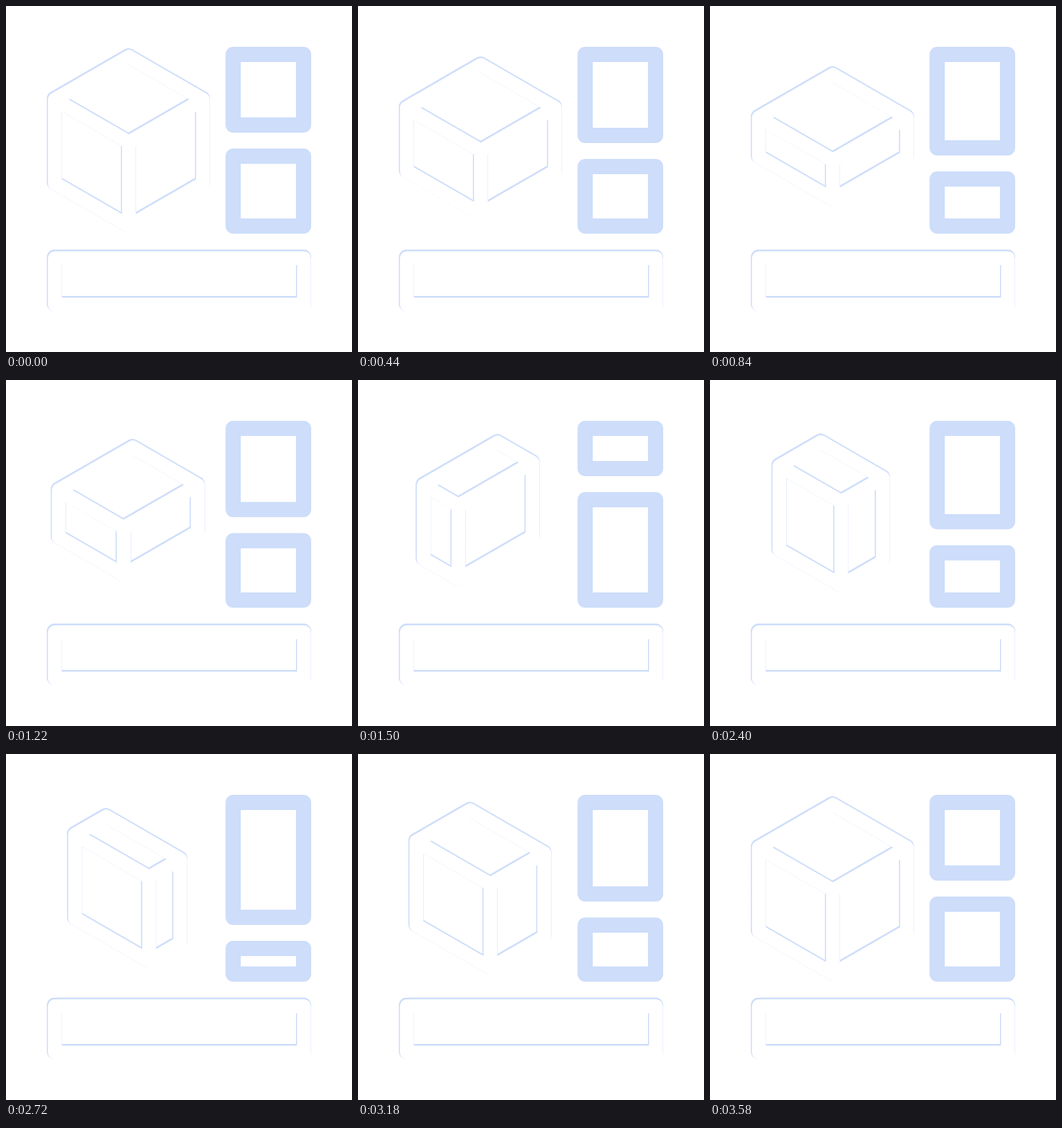
An HTML page with a canvas that plays this animation: 500 by 500 pixels, repeating every 3.6 s.

```html
<!DOCTYPE html>
<html lang="en">
<head>
<meta charset="utf-8">
<title>Box layout</title>
<style>
  html, body { margin: 0; width: 100%; height: 100%; overflow: hidden; background: #fff; }
  canvas { display: block; width: 500px; height: 500px; }
</style>
</head>
<body>
<canvas id="stage" width="500" height="500"></canvas>
<script>
const ctx = document.getElementById("stage").getContext("2d");
const LOOP = 3600;
const BLUE = "#cdddfa";
const SLOPE = Math.tan(Math.PI / 6);

// left: x of the left edge, top: y of the apex, a/b: widths of the left and
// right faces, height: of the box, split: lower edge of the upper square
const keys = [
  { at: 0,    left: 70,    top: 72,   a: 107,  b: 107, height: 121,  split: 172 },
  { at: 915,  left: 70,    top: 98.2, a: 107,  b: 107, height: 56.3, split: 205.2 },
  { at: 1830, left: 101.2, top: 86.4, a: 34.2, b: 107, height: 121,  split: 106 },
  { at: 2740, left: 99.2,  top: 89,   a: 107,  b: 45,  height: 121,  split: 236 }
];
keys.push({ ...keys[0], at: LOOP });

function easeInOut(x) {
  return x < 0.5 ? (2 * x) ** 2.5 / 2 : 1 - (2 - 2 * x) ** 2.5 / 2;
}

function poseAt(time) {
  const i = keys.findIndex(key => key.at > time);
  const from = keys[i - 1], to = keys[i];
  const p = easeInOut((time - from.at) / (to.at - from.at));
  const pose = {};
  for (const name in from) pose[name] = from[name] + (to[name] - from[name]) * p;
  return pose;
}

function polygon(path, points) {
  points.forEach(([x, y], i) => i ? path.lineTo(x, y) : path.moveTo(x, y));
  path.closePath();
}

function boxPath({ left, top, a, b, height }) {
  const path = new Path2D();
  const middle = left + a, right = middle + b;
  const leftY = top + b * SLOPE;
  const rightY = top + a * SLOPE;
  const middleY = leftY + a * SLOPE;
  const front = [middle, middleY], foot = [middle, middleY + height];
  polygon(path, [[left, leftY], [left + b, top], [right, rightY], front]);
  polygon(path, [[left, leftY], front, foot, [left, leftY + height]]);
  polygon(path, [front, [right, rightY], [right, rightY + height], foot]);
  return path;
}

function stroke(path, color, width) {
  ctx.strokeStyle = color;
  ctx.lineWidth = width;
  ctx.stroke(path);
}

// A white copy, slightly lower and thinner, leaves only rims of the blue line
function strokeRim(path) {
  stroke(path, BLUE, 22);
  ctx.save();
  ctx.translate(0.6, 1.4);
  stroke(path, "#fff", 20);
  ctx.restore();
}

function rectPath(x1, y1, x2, y2) {
  const path = new Path2D();
  path.rect(x1, y1, x2 - x1, y2 - y1);
  return path;
}

function draw(time) {
  const pose = poseAt(time);
  ctx.fillStyle = "#fff";
  ctx.fillRect(0, 0, 500, 500);
  ctx.lineJoin = "round";
  strokeRim(boxPath(pose));
  strokeRim(rectPath(70, 363, 430, 430));
  stroke(rectPath(328.3, 70, 430, pose.split), BLUE, 22);
  stroke(rectPath(328.3, pose.split + 45, 430, 318), BLUE, 22);
}

let start;
function tick(now) {
  start ??= now;
  draw((now - start) % LOOP);
  requestAnimationFrame(tick);
}
draw(0);
requestAnimationFrame(tick);
</script>
</body>
</html>
```
